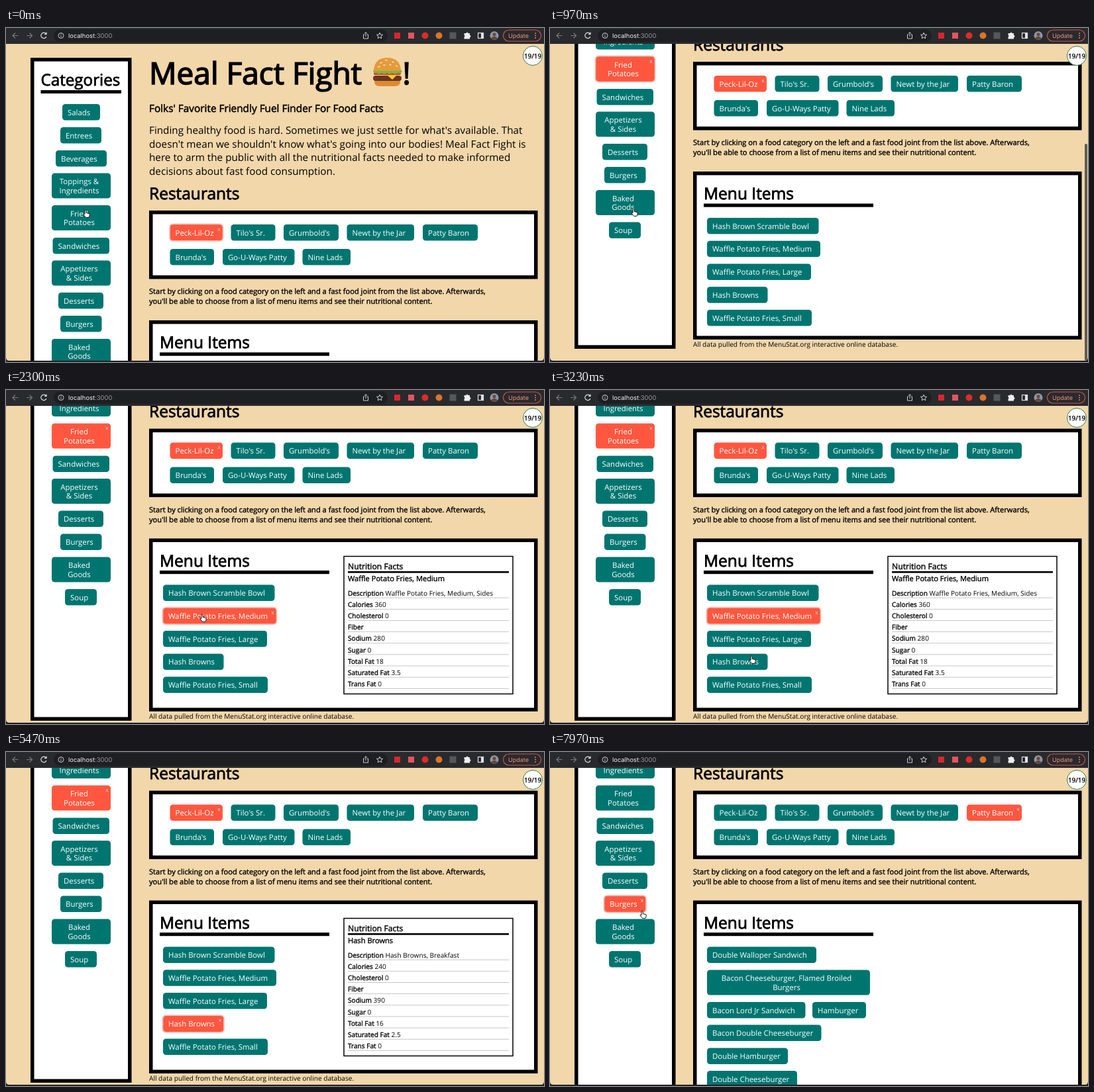
An HTML page that plays this animation: 812 by 505 pixels, repeating every 8 s.

```html
<!DOCTYPE html>
<html lang="en">
<head>
<meta charset="utf-8">
<title>Restaurant nutrition finder</title>
<style>
  html, body { margin: 0; width: 100%; height: 100%; overflow: hidden; background: #202124; }
  svg { display: block; width: 812px; height: 505px; }
  text { font-family: 'Open Sans', 'Noto Sans', sans-serif; text-rendering: geometricPrecision; white-space: pre; }
  .ui text { font-family: Inter, Roboto, sans-serif; }
</style>
</head>
<body>
<svg viewBox="0 0 812 505">
  <defs><clipPath id="view"><path d="M0 24H812V498q0 5-5 5H5q-5 0-5-5z"/></clipPath></defs>
  <rect width="812" height="505" fill="#242427"/>
  <g clip-path="url(#view)">
    <rect y="24" width="812" height="480" fill="#f1d7aa"/>
    <g id="page"></g>
    <rect id="thumb" x="807" width="4" height="328" rx="2" fill="#5f5c57"/>
    <circle cx="795" cy="42" r="14.5" fill="#fff" stroke="#2f7d46"/>
    <g id="badge"></g>
  </g>
  <g class="ui" fill="none" stroke="#dfe1e4" stroke-width="1.2">
    <rect width="812" height="24" fill="#292a2d" stroke="none"/>
    <rect x="72" y="2" width="504" height="19" rx="9.5" fill="#1e1f22" stroke="none"/>
    <path d="M18.500 11.500H10.500M14 7.500l-4 4 4 4M31 11.500h8M35.500 7.500l4 4-4 4" stroke="#77797d"/>
    <path d="M60.500 9a4.200 4.200 0 1 0 .4 4M61 6.500v3h-3"/>
    <g stroke-width=".9">
      <circle cx="83" cy="11.500" r="4"/><path d="M83 11v2.700M83 9v1"/>
      <path d="M541 10h-1.500v6h7v-6H545M543 13V7M541 8.500l2-2 2 2"/>
      <path d="M564 7l1.300 3 3.300.3-2.500 2.200.7 3.200-2.800-1.700-2.800 1.700.7-3.200-2.500-2.200 3.300-.3z"/>
    </g>
    <g stroke="none">
      <text x="94" y="15" font-size="9.400" fill="#f1f3f4">localhost<tspan fill="#96999e">:3000</tspan></text>
      <rect x="586" y="7" width="9" height="9" fill="#d9262e"/>
      <rect x="607" y="7" width="9" height="9" fill="#e65360"/>
      <circle cx="632.500" cy="11.500" r="5" fill="#e02b27"/>
      <circle cx="653.500" cy="11.500" r="5" fill="#dc7429"/>
      <rect x="669.500" y="6.500" width="10" height="10" fill="#55575a"/>
      <path d="M691.500 8h3a1.500 1.500 0 0 1 3 0h2.500v3a1.500 1.500 0 0 1 0 3v2.500h-8.500v-3a1.500 1.500 0 0 0 0-2.800z" fill="#eee"/>
      <circle cx="737" cy="11.500" r="6.500" fill="#8d98a6"/>
      <circle cx="737" cy="9.800" r="2.500" fill="#66473c"/>
      <path d="M732 15.600q5-6.200 10 0a6.500 6.500 0 0 1-10 0" fill="#66473c"/>
      <text x="758" y="14.800" font-size="9" fill="#f28b82">Update</text>
      <g fill="#f28b82"><circle cx="799" cy="8" r=".9"/><circle cx="799" cy="11.500" r=".9"/><circle cx="799" cy="15" r=".9"/></g>
    </g>
    <rect x="712.500" y="7.500" width="8" height="8"/><path d="M718.500 8v7" stroke-width="3"/>
    <rect x="750.500" y="3" width="57" height="17" rx="8.500" stroke="#c5574f"/>
  </g>
  <path id="cursor" stroke-width="1" stroke-linejoin="round"/>
</svg>
<script>
const LOOP = 8000, PRESS = 120;
const TEAL = '#007570', RED = '#ff573f';
const $ = id => document.getElementById(id);

// Each button: label ("|" breaks the line), x, y, width
const categories = [
  ['Salads', 85, 115, 57], ['Entrees', 82, 150, 62], ['Beverages', 75, 185, 77],
  ['Toppings &amp;|Ingredients', 69, 219.5, 89], ['Fried|Potatoes', 69, 268, 89],
  ['Sandwiches', 70.5, 317, 85.5], ['Appetizers|&amp; Sides', 69, 351.5, 89],
  ['Desserts', 79, 400, 68], ['Burgers', 82, 435, 62.5],
  ['Baked|Goods', 69, 470, 89], ['Soup', 89, 518.5, 48]
];
const brands = [
  ['Peck-Lil-Oz', 247.5, 297, 79.5], ["Tilo's Sr.", 339.5, 297, 67], ["Grumbold's", 419, 297, 83],
  ['Newt by the Jar', 514.5, 297, 101.5], ['Patty Baron', 629, 297, 83],
  ["Brunda's", 247.5, 334, 66.5], ['Go-U-Ways Patty', 327, 334, 108.5], ['Nine Lads', 447.5, 334, 72.5]
];
const column = rows => rows.map(([label, w], i) => [label, 237, 512 + i * 34.75, w]);
const menus = {
  wings: column([['Hash Brown Scramble Bowl', 168.5], ['Waffle Potato Fries, Medium', 171],
    ['Waffle Potato Fries, Large', 157], ['Hash Browns', 91.5], ['Waffle Potato Fries, Small', 158]]),
  fries: column([['French Fries, Small', 122], ['French Fries, Medium', 135],
    ['French Fries, Large', 121], ['Hash Browns, Small', 123], ['Hash Browns, Large', 122]]),
  burgers: [
    ['Double Walloper Sandwich', 237, 512, 165], ['Bacon Cheeseburger, Flamed Broiled|Burgers', 237, 547, 246],
    ['Bacon Lord Jr Sandwich', 237, 595.5, 148.5], ['Hamburger', 396, 595.5, 81],
    ['Bacon Double Cheeseburger', 237, 630, 172.5], ['Double Hamburger', 237, 665, 122],
    ['Double Cheeseburger', 237, 699.5, 136]
  ]
};
const facts = {
  'Waffle Potato Fries, Medium': ['Waffle Potato Fries, Medium, Sides', 360, 0, '', 280, 0, 18, 3.5, 0],
  'Hash Browns': ['Hash Browns, Breakfast', 240, 0, '', 390, 0, 16, 2.5, 0]
};
const factNames = ['Description', 'Calories', 'Cholesterol', 'Fiber', 'Sodium', 'Sugar',
  'Total Fat', 'Saturated Fat', 'Trans Fat'];

const clicks = [
  [30, 'category', 'Fried|Potatoes'],
  [2150, 'item', 'Waffle Potato Fries, Medium'],
  [3550, 'item', 'Hash Browns'],
  [6560, 'brand', 'Patty Baron'],
  [7650, 'category', 'Burgers']
];
const scrollKeys = [[670, 0], [970, 225], [1260, 217.5]];
const cursorKeys = [
  [0, 122, 281], [330, 124, 281], [670, 124, 281], [970, 128, 279], [1040, 129, 280],
  [1380, 288, 313], [1480, 288, 314], [1900, 296, 342], [2350, 298, 345], [3000, 305, 407],
  [3230, 306, 408], [3850, 300, 411], [4700, 330, 400], [5300, 560, -14], [5750, 600, -14],
  [6450, 657, 104], [6850, 657, 104], [7550, 141, 244], [7970, 141, 246]
];

const rect = (x, y, w, h, fill, extra = '') =>
  `<rect x="${x}" y="${y}" width="${w}" height="${h}" fill="${fill}" ${extra}/>`;
const text = (x, y, size, content, extra = '') =>
  `<text x="${x}" y="${y}" font-size="${size}" ${extra}>${content}</text>`;
const heavy = size => `stroke="#000" stroke-width="${size / 30}"`;
const bold = (x, y, size, content) => text(x, y, size, content, heavy(size));
const frame = (x, y, w, h) => rect(x + 2.75, y + 2.75, w - 5.5, h - 5.5, '#fff', 'stroke="#000" stroke-width="5.5"');

function button([label, x, y, w], state) {
  const lines = label.split('|'), h = lines.length > 1 ? 38 : 24.5;
  const selected = [state.category, state.brand, state.item].includes(label);
  const focused = state.focus === label;
  if (focused && state.pressed) y += 0.8;
  let out = rect(x, y, w, h, selected ? RED : TEAL, 'rx="4.5"');
  if (focused) {
    out += rect(x - .6, y - .6, w + 1.2, h + 1.2, 'none',
      `rx="5" stroke="${selected ? '#ecc4ba' : '#a5aaa9'}" stroke-width="1.8"`);
  }
  lines.forEach((line, i) => {
    const centred = lines.length > 1;
    out += text(centred ? x + w / 2 - 3 : x + 8, y + 16.6 + i * 13.6, 11.43, line,
      `fill="#fff" ${centred ? 'text-anchor="middle"' : ''}`);
  });
  return selected ? out + text(x + w - 7.5, y + 9.5, 7.5, 'x', 'fill="#fff"') : out;
}

const burger = `<g transform="translate(553 45)">
  <path d="M3 31h39v5q0 7-8 7H11q-8 0-8-7z" fill="#dc8b32"/>
  <rect x="1" y="27" width="43" height="8" rx="4" fill="#6b3521"/>
  <path d="M2 24h41l-7 3-6 6-7-6z" fill="#fbc740"/>
  <rect x="2" y="21.500" width="41" height="4.500" rx="2" fill="#d8402c"/>
  <path d="M1 20q3-3 7-1h30q5-2 7 2-3 4-7 2-4 3-8 0-4 3-8 0-4 3-8 0-4 3-7 0-5 1-6-3z" fill="#78b83b"/>
  <path d="M2 18Q4 0 22.500 0T43 18q0 2-3 2H5q-3 0-3-2z" fill="#e59a3d"/>
  <path d="M12 8l2-1M20 4h2M30 6l2 1M17 11h2M26 10l2 1M36 12l1 1M9 14l2-1" stroke="#fbe5b4" stroke-width="1.600" stroke-linecap="round"/>
</g>`;

function nutrition(item) {
  const values = facts[item];
  if (!values) return '';
  let out = rect(510, 469, 255, 208, '#fff', 'stroke="#000" stroke-width="1.5"') +
    bold(516, 488, 12.2, 'Nutrition Facts') + rect(516, 491.5, 243, 2.6, '#000') +
    bold(516, 506.3, 11.12, item);
  factNames.forEach((name, i) => {
    const y = 528.3 + i * 17.15;
    out += text(516, y, 10.1, `<tspan ${heavy(10.1)}>${name}</tspan> ${values[i]}`) +
      rect(516, y + 3, 243, .8, '#b9b9b9');
  });
  return out;
}

function menuFor({ category, brand }) {
  if (!category) return [];
  if (category === 'Burgers') return menus.burgers;
  return brand === 'Patty Baron' ? menus.fries : menus.wings;
}

let buttons = [];
function drawPage(state) {
  const menu = menuFor(state);
  buttons = [...categories, ...brands, ...menu];
  const bottom = menu === menus.burgers ? 1000 : state.item ? 703.5 : 696;
  const intro = [
    "Finding healthy food is hard. Sometimes we just settle for what's available. That",
    "doesn't mean we shouldn't know what's going into our bodies! Meal Fact Fight is",
    'here to arm the public with all the nutritional facts needed to make informed',
    'decisions about fast food consumption.'
  ];
  $('page').innerHTML =
    frame(37, 45, 152.5, bottom - 31) + bold(52.5, 86.5, 24.2, 'Categories') + rect(52.5, 94, 121.5, 5, '#000') +
    bold(216, 85, 46, 'Meal Fact Fight') + burger + bold(598.5, 85, 46, '!') +
    bold(216, 127, 15.36, "Folks' Favorite Friendly Fuel Finder For Food Facts") +
    intro.map((line, i) => text(216, 160 + i * 20.5, 15.27, line)).join('') +
    bold(216, 258.5, 24.5, 'Restaurants') + frame(216, 276, 586.5, 103.5) +
    bold(216, 402, 11.12, 'Start by clicking on a food category on the left and a fast food joint from the list above. Afterwards,') +
    bold(216, 417, 11.12, "you'll be able to choose from a list of menu items and see their nutritional content.") +
    frame(216, 442, 586.5, bottom - 442) + bold(232, 484, 24.5, 'Menu Items') + rect(232, 490.5, 256, 5.2, '#000') +
    nutrition(state.item) +
    text(216, bottom + 11.3, 10.1, 'All data pulled from the MenuStat.org interactive online database.') +
    buttons.map(b => button(b, state)).join('');
}

function stateAt(t) {
  const state = { category: '', brand: 'Peck-Lil-Oz', item: '', focus: 'Peck-Lil-Oz', pressed: false };
  for (const [at, kind, label] of clicks) {
    if (t < at) break;
    state.focus = label;
    state.pressed = t < at + PRESS;
    if (state.pressed) break;
    state.item = '';
    state[kind] = label;
  }
  return state;
}

// Eased interpolation between keys of the form [time, ...values]
function track(keys, t) {
  const next = keys.findIndex(key => key[0] > t);
  if (next === 0) return keys[0].slice(1);
  if (next < 0) return keys[keys.length - 1].slice(1);
  const a = keys[next - 1], b = keys[next], p = (t - a[0]) / (b[0] - a[0]);
  const eased = p * p * (3 - 2 * p);
  return a.slice(1).map((v, i) => v + (b[i + 1] - v) * eased);
}

const HAND = 'M-3-4.6a1.100 1.100 0 0 1 2.200 0v3.200l3.800.8q1.400.3 1.300 1.700l-.5 2.600q-.3 1.800-1.900 1.800h-2.400q-1 0-1.600-.8l-2.800-3.500q-.4-1.300 1-1.200l.9.7z';
const ARROW = 'M-3-5v9.500l2.200-2 1.500 3.300 1.600-.7-1.500-3.200h3.100z';

function drawCursor(t, scroll) {
  const [x, y] = track(cursorKeys, t);
  const pageY = y - 5 + scroll;
  const over = y > 24 && buttons.some(([label, bx, by, w]) =>
    x > bx && x < bx + w && pageY > by && pageY < by + (label.includes('|') ? 38 : 24.5));
  const cursor = $('cursor');
  cursor.setAttribute('d', over ? HAND : ARROW);
  cursor.setAttribute('fill', over ? '#fff' : '#000');
  cursor.setAttribute('stroke', over ? '#111' : '#fff');
  cursor.setAttribute('transform', `translate(${x} ${y})`);
}

$('badge').innerHTML = text(795, 45.5, 9.8, '19/19', `text-anchor="middle" ${heavy(9.8)}`);

let shown = '';
function tick() {
  const t = performance.now() % LOOP;
  const state = stateAt(t), key = JSON.stringify(state);
  if (key !== shown) drawPage(state);
  shown = key;
  const [scroll] = track(scrollKeys, t);
  $('page').setAttribute('transform', `translate(0 ${-scroll})`);
  $('thumb').setAttribute('y', 24 + Math.min(scroll, 219) * .69);
  $('thumb').setAttribute('opacity', t < 670 ? 0 : Math.max(0, Math.min(1, (2000 - t) / 250)));
  drawCursor(t, scroll);
  requestAnimationFrame(tick);
}
tick();
</script>
</body>
</html>
```
